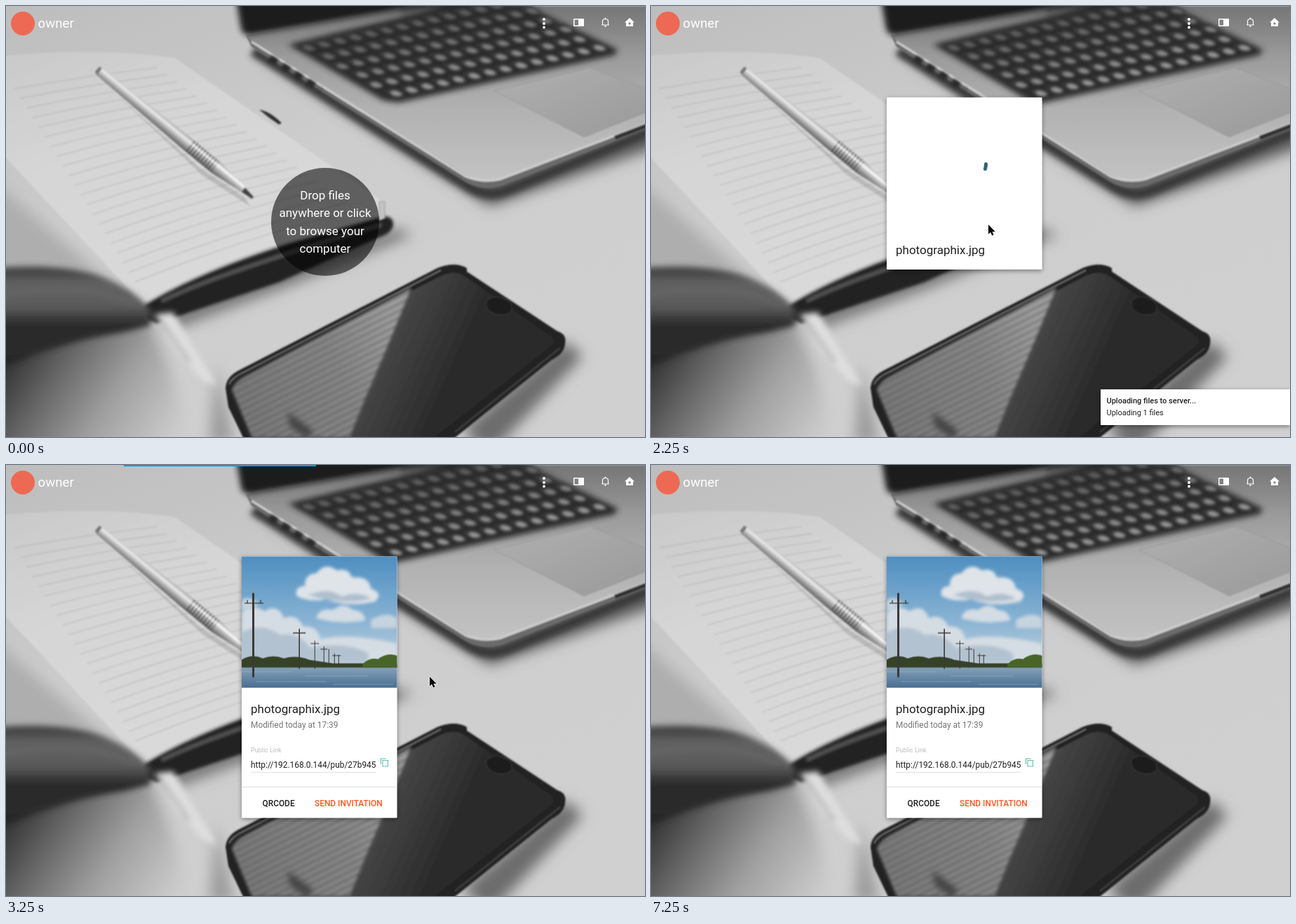
Animation, 911 px wide and 615 px high, one loop 7.5 s. Source, as an HTML page:

```html
<!DOCTYPE html>
<html lang="en">
<head>
<meta charset="utf-8">
<title>File drop</title>
<style>
html, body { margin: 0; width: 100%; height: 100%; overflow: hidden; background: #ccc; }
svg.layer { position: absolute; left: 0; top: 0; width: 911px; height: 615px; }
text { font-family: Roboto, sans-serif; fill: #212121; }
.mid { text-anchor: middle; font-size: 17px; }
.small { font-size: 11px; }
.field { font-size: 11.9px; }
.medium { font-weight: 500; }

.anim { animation: 7500ms step-end infinite; }
#disc { animation-name: disc; }
#disc text { fill: currentColor; }
#drag { animation-name: drag; }
#pointer { animation-name: pointer; }
#card { animation-name: card; }
#sheet { animation-name: sheet; }
#spinner { animation-name: spinner; }
#loading { animation-name: loading; }
#ready { animation-name: ready; }
#toast { animation-name: toast; }
#bar { animation-name: bar; }

@keyframes disc {
  0% { fill: rgba(0,0,0,.56); color: #fff; opacity: 1; filter: none; }
  20% { fill: rgba(170,170,170,.82); color: #777; }
  23.33% { fill: #fff; color: #212121; filter: drop-shadow(0 1px 3px rgba(0,0,0,.45)); }
  30%, 100% { opacity: 0; }
}
@keyframes drag {
  0% { opacity: 0; transform: translate(398px,-71px); }
  16.66% { opacity: 1; transform: translate(398px,-71px); }
  20% { opacity: 1; transform: translate(45px,-8px); }
  23.33% { opacity: 1; transform: none; }
  30%, 100% { opacity: 0; transform: none; }
}
@keyframes pointer {
  0% { opacity: 0; transform: translate(879px,241px); }
  16.66% { opacity: 1; transform: translate(879px,241px); }
  20% { opacity: 1; transform: translate(526px,304px); }
  23.33% { opacity: 1; transform: translate(481px,312px); }
  33.33% { opacity: 1; transform: translate(492px,311px); }
  36.66% { opacity: 1; transform: translate(578.5px,302.5px); }
  40% { opacity: 1; transform: translate(600px,302px); }
  43.33% { opacity: 1; transform: translate(604px,302px); }
  50% { opacity: 1; transform: translate(572px,391px); }
  53.33% { opacity: 1; transform: translate(536px,434px); }
  56.66% { opacity: 1; transform: translate(534px,430px); }
  76.66% { opacity: 1; transform: translate(537px,429px); }
  80% { opacity: 1; transform: translate(545px,429px); }
  83.33% { opacity: 1; transform: translate(719px,376px); }
  86.66% { opacity: 1; transform: translate(880.5px,324.5px); }
  90%, 100% { opacity: 0; transform: translate(880px,324px); }
}
@keyframes card { 0% { opacity: 0; } 30%, 100% { opacity: 1; } }
@keyframes sheet { 0% { height: 245.5px; } 36.66% { height: 306.5px; } 43.33%, 100% { height: 373px; } }
@keyframes spinner {
  0% { opacity: 1; stroke-dasharray: 13 347; }
  33.33% { opacity: 1; stroke-dasharray: 98 262; }
  36.66%, 100% { opacity: 0; }
}
@keyframes loading { 0% { opacity: 0; } 36.66% { opacity: 1; } 43.33%, 100% { opacity: 0; } }
@keyframes ready { 0% { opacity: 0; } 43.33%, 100% { opacity: 1; } }
@keyframes toast {
  0% { opacity: 0; transform: translateX(911px); }
  30% { opacity: 1; transform: translateX(641px); }
  33.33% { opacity: 1; transform: translateX(631px); }
  36.66% { opacity: 1; transform: translateX(862px); }
  40%, 100% { opacity: 0; transform: translateX(911px); }
}
@keyframes bar {
  0% { x: 0; width: 0; }
  36.66% { x: 0; width: 181px; }
  40% { x: 37px; width: 290px; }
  43.33% { x: 168px; width: 274px; }
  46.66%, 100% { x: 0; width: 0; }
}
</style>
</head>
<body>
<!-- Desk photograph, reduced to soft shapes -->
<svg class="layer" viewBox="0 0 911 615">
  <defs>
    <filter id="b1" filterUnits="userSpaceOnUse" x="-60" y="-60" width="1040" height="740"><feGaussianBlur stdDeviation="1"/></filter>
    <filter id="b2" filterUnits="userSpaceOnUse" x="-60" y="-60" width="1040" height="740"><feGaussianBlur stdDeviation="2"/></filter>
    <filter id="b4" filterUnits="userSpaceOnUse" x="-60" y="-60" width="1040" height="740"><feGaussianBlur stdDeviation="4"/></filter>
    <filter id="b10" filterUnits="userSpaceOnUse" x="-60" y="-60" width="1040" height="740"><feGaussianBlur stdDeviation="10"/></filter>
    <linearGradient id="desk" x2=".6" y2="1"><stop stop-color="#bdbdbd"/><stop offset=".45" stop-color="#cdcdcd"/><stop offset="1" stop-color="#d0d0d0"/></linearGradient>
    <linearGradient id="page" x2=".6" y2="1"><stop stop-color="#c9c9c9"/><stop offset=".4" stop-color="#d6d6d6"/><stop offset="1" stop-color="#dadada"/></linearGradient>
    <linearGradient id="shade" gradientUnits="userSpaceOnUse" x1="20" y1="475" x2="240" y2="620"><stop stop-color="#303030"/><stop offset=".25" stop-color="#626262"/><stop offset=".6" stop-color="#a0a0a0"/><stop offset="1" stop-color="#cdcdcd"/></linearGradient>
    <linearGradient id="leaf" gradientUnits="userSpaceOnUse" x1="0" y1="374" x2="0" y2="520"><stop stop-color="#3c3c3c"/><stop offset=".15" stop-color="#626262"/><stop offset=".38" stop-color="#5a5a5a"/><stop offset=".55" stop-color="#2c2c2c"/><stop offset="1" stop-color="#272727"/></linearGradient>
    <linearGradient id="metal" x2="0" y2="1"><stop stop-color="#757575"/><stop offset=".3" stop-color="#9c9c9c"/><stop offset=".6" stop-color="#b2b2b2"/><stop offset="1" stop-color="#c3c3c3"/></linearGradient>
    <linearGradient id="pad" x2="1" y2="1"><stop stop-color="#b0b0b0"/><stop offset="1" stop-color="#9a9a9a"/></linearGradient>
    <linearGradient id="pen" x2="0" y2="1"><stop stop-color="#a4a4a4"/><stop offset=".3" stop-color="#ececec"/><stop offset=".6" stop-color="#aaa"/><stop offset="1" stop-color="#5c5c5c"/></linearGradient>
    <linearGradient id="gloss" gradientUnits="userSpaceOnUse" x1="330" y1="560" x2="560" y2="470"><stop stop-color="#7c7c7c"/><stop offset=".6" stop-color="#8a8a8a"/><stop offset="1" stop-color="#a2a2a2"/></linearGradient>
    <linearGradient id="glass" gradientUnits="userSpaceOnUse" x1="540" y1="470" x2="640" y2="515"><stop stop-color="#484848"/><stop offset="1" stop-color="#2b2b2b"/></linearGradient>
    <clipPath id="glossArea"><path id="glossShape" d="M322,548 Q324,538 338,530 L578,402 L542,490 L512,560 L490,615 H350Z"/></clipPath>
  </defs>
  <rect width="911" height="615" fill="url(#desk)"/>
  <g filter="url(#b10)">
    <path d="M-40,230 L185,425 L-40,380Z" fill="#aeaeae"/>
    <path d="M-50,440 L200,440 L235,520 L270,660 H-50Z" fill="url(#shade)"/>
    <path d="M225,440 L555,318 L580,326 L400,400 L240,460Z" fill="#6e6e6e"/>
    <path d="M352,66 L655,262 L690,285 L930,200 V170 L690,255Z" fill="#555"/>
    <path d="M650,605 L798,478 L822,500 L690,640Z" fill="#6c6c6c"/>
    <path d="M300,510 L325,625 H290Z" fill="#999"/>
  </g>

  <path d="M-10,72 Q130,58 240,74 L541,282 L537,301 Q330,343 194,424 L-10,206Z" fill="url(#page)" filter="url(#b1)"/>
  <g id="rules" fill="none" stroke="#777" stroke-opacity=".28" stroke-width="1.1" filter="url(#b1)"></g>
  <path d="M361,148 Q376,150 393,167 L389,169 L376,160Z" fill="#333" filter="url(#b1)"/>
  <g filter="url(#b2)">
    <path d="M196,428 Q270,382 400,340 L536,301 Q552,298 552,312 Q551,323 535,329 L390,394 L215,453 L190,443Z" fill="#242424"/>
    <path d="M222,421 Q300,382 535,312" fill="none" stroke="#565656" stroke-width="5"/>
  </g>
  <path d="M532,279 H540 V303 L532,306Z" fill="#c4c4c4" stroke="#888" stroke-width=".8" filter="url(#b1)"/>
  <g filter="url(#b4)">
    <path d="M-15,374 Q95,366 150,392 Q185,408 205,432 L206,456 L165,466 Q80,478 -15,520Z" fill="url(#leaf)"/>
    <path d="M-10,415 Q100,390 190,428" fill="none" stroke="#777" stroke-width="4" opacity=".5"/>
    <path d="M212,440 L238,437 L272,495 L302,542 L282,536 L244,494Z" fill="#dedede"/>
    <path d="M219,446 L262,508" stroke="#aaa" stroke-width="4"/>
  </g>

  <g transform="translate(131,92) rotate(39.4)" filter="url(#b1)">
    <path d="M45,10 L200,15 L275,7 L292,12 L210,21Z" fill="#777" opacity=".3"/>
    <path d="M2,-6 Q-4,0 2,6 L165,10 H218 L268,4 V-4 L218,-10 H165Z" fill="url(#pen)"/>
    <path d="M268,-4 L286,-1.5 V2 L268,4Z" fill="#444"/>
    <path d="M170,0 H216" stroke="#484848" stroke-width="19" stroke-dasharray="1.8 3.2"/>
    <path d="M170,-4 H266" stroke="#fff" stroke-width="3" opacity=".7"/>
    <rect x="-2" y="-6" width="5" height="11" rx="2" fill="#777"/>
  </g>

  <path d="M352,64 L655,255 Q682,274 712,264 L920,178" fill="none" stroke="#383838" stroke-width="15" filter="url(#b4)"/>
  <g filter="url(#b1)">
    <path d="M342,42 L590,0 H920 V172 L705,256 Q680,265 655,251 L350,58Z" fill="#6a6a6a"/>
    <path d="M342,42 L590,0 H920 V166 L705,247 Q680,253 655,241 L352,52Z" fill="url(#metal)"/>
    <path d="M350,51 L655,243 Q680,253 705,247 L915,167" fill="none" stroke="#d0d0d0" stroke-width="3"/>
    <path d="M868,188 L915,170" stroke="#333" stroke-width="6"/>
    <path d="M696,121 L833,88 L915,119 V151 L824,187Z" fill="url(#pad)" stroke="#999" stroke-width="1"/>
  </g>
  <path d="M376,74 L448,119" stroke="#262626" stroke-width="9" stroke-dasharray="12 9" filter="url(#b2)"/>
  <g filter="url(#b4)">
    <path d="M328,-10 L335,32 Q337,42 350,42 L590,3 L700,-10Z" fill="#1d1d1d"/>
    <path d="M352,47 L560,10" stroke="#888" stroke-width="4"/>
    <path d="M402,55 L640,-4 H735 L872,62 L868,70 L560,138 L538,135Z" fill="#2b2b2b"/>
  </g>
  <g filter="url(#b2)"><g id="keys" transform="matrix(22.3,-5,24,13.2,407,55)"></g></g>

  <g filter="url(#b1)">
    <path d="M313,545 Q314,530 330,521 L615,374 Q640,364 657,374 V379 L786,464 Q800,468 797,482 Q796,496 778,505 L635,620 H340 L317,572Z" fill="#202020"/>
    <path d="M326,545 Q328,536 345,528 L620,385 Q640,376 655,386 L778,472 Q784,480 776,486 L605,620 H355Z" fill="url(#glass)"/>
    <path d="M318,540 Q322,530 340,522 L620,377" fill="none" stroke="#777" stroke-width="1.5"/>
    <path d="M790,488 L640,608" stroke="#444" stroke-width="2"/>
    <ellipse cx="703" cy="428" rx="19" ry="12.5" transform="rotate(15 703 428)" fill="#1e1e1e" stroke="#3a3a3a"/>
  </g>
  <g filter="url(#b2)">
    <use href="#glossShape" fill="url(#gloss)"/>
    <g id="reflection" clip-path="url(#glossArea)" stroke="#4c4c4c" stroke-opacity=".5" stroke-width="3.5"></g>
  </g>
  <path d="M401,579 L438,606 L430,618 L405,600Z" fill="#444" filter="url(#b4)"/>
</svg>

<svg class="layer" viewBox="0 0 911 615">
  <defs>
    <linearGradient id="sky" x2="0" y2="1"><stop stop-color="#4f8fc1"/><stop offset=".5" stop-color="#8ab4d4"/><stop offset=".8" stop-color="#c0d0dc"/></linearGradient>
    <linearGradient id="water" x2="0" y2="1"><stop stop-color="#8aa5bc"/><stop offset="1" stop-color="#486e93"/></linearGradient>
    <filter id="soft" x="-20%" y="-20%" width="140%" height="140%"><feGaussianBlur stdDeviation="2"/></filter>
    <filter id="lift" x="-20%" y="-20%" width="140%" height="140%"><feDropShadow dx="0" dy="2" stdDeviation="3" flood-opacity=".42"/></filter>
    <symbol id="photo" viewBox="0 0 221 187" preserveAspectRatio="none">
      <rect width="221" height="187" fill="url(#sky)"/>
      <g filter="url(#soft)">
        <path d="M0,80 Q18,66 32,78 Q52,66 60,88 Q78,80 88,100 Q108,98 112,118 Q150,108 221,124 V150 H0Z" fill="#d5dde4"/>
        <path d="M0,108 Q30,92 55,112 Q78,106 98,130 Q150,120 180,138 V150 H0Z" fill="#b3c2d0"/>
        <path d="M106,88 Q110,72 130,76 Q145,64 158,76 Q174,77 176,91 Q142,98 106,88Z" fill="#d4dde5"/>
        <path d="M78,56 Q75,43 90,42 Q89,25 106,24 Q119,7 136,20 Q151,15 157,30 Q181,27 184,46 Q202,52 190,64 Q150,73 120,61 Q96,66 78,56Z" fill="#dfe4e9"/>
        <path d="M94,55 Q126,43 142,57 Q166,48 184,60 Q146,70 94,55Z" fill="#afbfce"/>
        <path d="M0,62 Q12,54 24,68 L0,78Z M184,90 Q207,77 221,88 V102 H184Z" fill="#c6d4df"/>
      </g>
      <rect y="156" width="221" height="31" fill="url(#water)"/>
      <path d="M0,147 Q15,138 30,145 Q45,139 60,145 Q78,140 96,147 L130,152 H221 V158 H0Z" fill="#354228"/>
      <path d="M172,153 Q182,143 194,146 Q207,136 221,141 V158 H172Z" fill="#486429"/>
      <path d="M0,164 H70 M90,170 H180 M20,178 H120 M130,182 H215" stroke="#b0c4d6" opacity=".4"/>
      <g fill="none" stroke="#3b3836">
        <path d="M16.5,52 V172" stroke-width="3"/>
        <path d="M4,66.5 H31 M8,62 V67 M27,62 V67" stroke-width="1.3"/>
        <path d="M82,103 V160 M73,109 H91" stroke-width="1.6"/>
        <path d="M104,120 V160 M98,124 H110 M117,128 V158 M112,132 H122 M124,132 V157 M132,138 V157 M138,140 V157 M129,141 H141"/>
      </g>
    </symbol>
  </defs>

  <circle cx="24" cy="25" r="17" fill="#ee6953"/>
  <text x="45.5" y="30.5" font-size="18.7" style="fill:#fff">owner</text>
  <g fill="#fff">
    <circle cx="767" cy="19" r="2"/><circle cx="767" cy="25" r="2"/><circle cx="767" cy="30.5" r="2"/>
    <path d="M810,18 H823 Q824,18 824,19 V28 Q824,29 823,29 H810 Q809,29 809,28 V19 Q809,18 810,18Z M810.5,19.5 V27.5 H816 V19.5Z" fill-rule="evenodd"/>
    <path d="M850.5,26.5 V22 Q850.5,18.5 854.5,18.5 Q858.5,18.5 858.5,22 V26.5 L859.5,27 H849.5Z" fill="none" stroke="#fff" stroke-width="1.2"/>
    <path d="M853,28 H856 Q855.5,30 854.5,30 Q853.5,30 853,28Z M853.8,16.5 H855.2 V19 H853.8Z"/>
    <path d="M889,17 L896,23.5 H894 V29 H884 V23.5 H882Z"/>
    <circle cx="889" cy="25" r="1.7" fill="#888"/>
  </g>
  <rect id="bar" class="anim" y="0" width="0" height="2" fill="#039be5"/>

  <g id="disc" class="anim">
    <circle cx="455" cy="308" r="77"/>
    <text class="mid" x="455" y="275.5">Drop files</text>
    <text class="mid" x="455" y="301">anywhere or click</text>
    <text class="mid" x="455" y="326.7">to browse your</text>
    <text class="mid" x="455" y="352.3">computer</text>
  </g>

  <g id="card" class="anim">
    <rect id="sheet" class="anim" x="336" y="130.5" width="221.5" height="373" rx="1" fill="#fff" filter="url(#lift)"/>
    <text x="349" y="353.5" font-size="17">photographix.jpg</text>
    <circle id="spinner" class="anim" cx="446.5" cy="224.5" r="31" pathLength="360" transform="rotate(2 446.5 224.5)" fill="none" stroke="#2d6076" stroke-width="5" stroke-linecap="round"/>
    <g id="loading" class="anim">
      <rect x="336" y="130.5" width="221.5" height="187.5" fill="#eaeef1"/>
      <text class="field" x="349" y="375" style="fill:#757575">Modified today at 17:39</text>
      <text class="small" x="349" y="419">Generating link...</text>
    </g>
    <g id="ready" class="anim">
      <use href="#photo" x="336" y="130.5" width="221.5" height="187.5"/>
      <text class="field" x="349" y="375" style="fill:#757575">Modified today at 17:39</text>
      <text x="349" y="409.5" font-size="9" style="fill:#bdbdbd">Public Link</text>
      <text class="field" x="349" y="431.5">http://192.168.0.144/pub/27b945</text>
      <path d="M349,438.5 H528 M336,459.5 H557.5" stroke="#e0e0e0"/>
      <path d="M534.5,427 V419 H542 M537,421.5 H544.5 V430 H537Z" fill="none" stroke="#5cc0b2" stroke-width="1.1"/>
      <text class="field medium" x="365.5" y="487">QRCODE</text>
      <text class="field medium" x="440" y="487" style="fill:#ff5722">SEND INVITATION</text>
    </g>
  </g>

  <g id="toast" class="anim">
    <rect y="547" width="270" height="51" fill="#fff" filter="url(#lift)"/>
    <text class="small medium" x="8.5" y="567">Uploading files to server...</text>
    <text class="small" x="8.5" y="584">Uploading 1 files</text>
  </g>

  <g id="drag" class="anim">
    <g opacity=".85">
      <rect x="449" y="277" width="41" height="41" fill="#fff" stroke="#bbb" stroke-width=".5"/>
      <use href="#photo" x="451" y="279" width="37" height="37"/>
    </g>
    <g fill="#2f7de1">
      <rect x="425" y="326" width="89" height="14.5" rx="2.5"/>
      <rect x="463" y="339" width="13" height="15" rx="2.5"/>
    </g>
    <g font-size="10.4" font-weight="600" text-anchor="middle">
      <text x="469.5" y="337" style="fill:#fff;font-family:Inter,sans-serif">photographix.jp</text>
      <text x="469.5" y="350.5" style="fill:#fff;font-family:Inter,sans-serif">g</text>
    </g>
  </g>
  <g id="pointer" class="anim">
    <path d="M0,0 V13.5 L3.1,10.7 L5.2,15.4 L7.5,14.4 L5.5,9.9 H9.7Z" fill="#000" stroke="#fff" stroke-width="1.2" paint-order="stroke"/>
  </g>
</svg>

<script>
function add(parent, tag, attrs) {
  const node = document.createElementNS("http://www.w3.org/2000/svg", tag);
  for (const name in attrs) node.setAttribute(name, attrs[name]);
  document.getElementById(parent).append(node);
}

// Ruled lines tilt more towards the near edge of the page.
for (let i = 0; i < 21; i++) {
  const t = i / 20;
  const x1 = 12 + 172 * t, y1 = 118 + 276 * t;
  const x2 = 215 + 285 * t, y2 = 88 + 203 * t;
  add("rules", "path", { d: `M${x1},${y1} Q${(x1 + x2) / 2},${(y1 + y2) / 2 - 3 - 10 * t} ${x2},${y2}` });
}

// Key legends glow brighter towards the front row.
for (let row = 0; row < 6; row++) {
  for (let col = 0; col < 14; col++) {
    const x = col + .12 + (row % 2) * .2, y = row + .12;
    add("keys", "rect", { x, y, width: .76, height: .7, rx: .15, fill: "#3a3a3a" });
    add("keys", "ellipse", { cx: x + .38, cy: y + .45, rx: .24, ry: .24, fill: "#b4b4b4", opacity: .3 + .1 * row });
  }
}

for (let y = 470; y < 800; y += 10) {
  add("reflection", "path", { d: `M310,${y + 70} L590,${y - 70}` });
}
</script>
</body>
</html>
```
